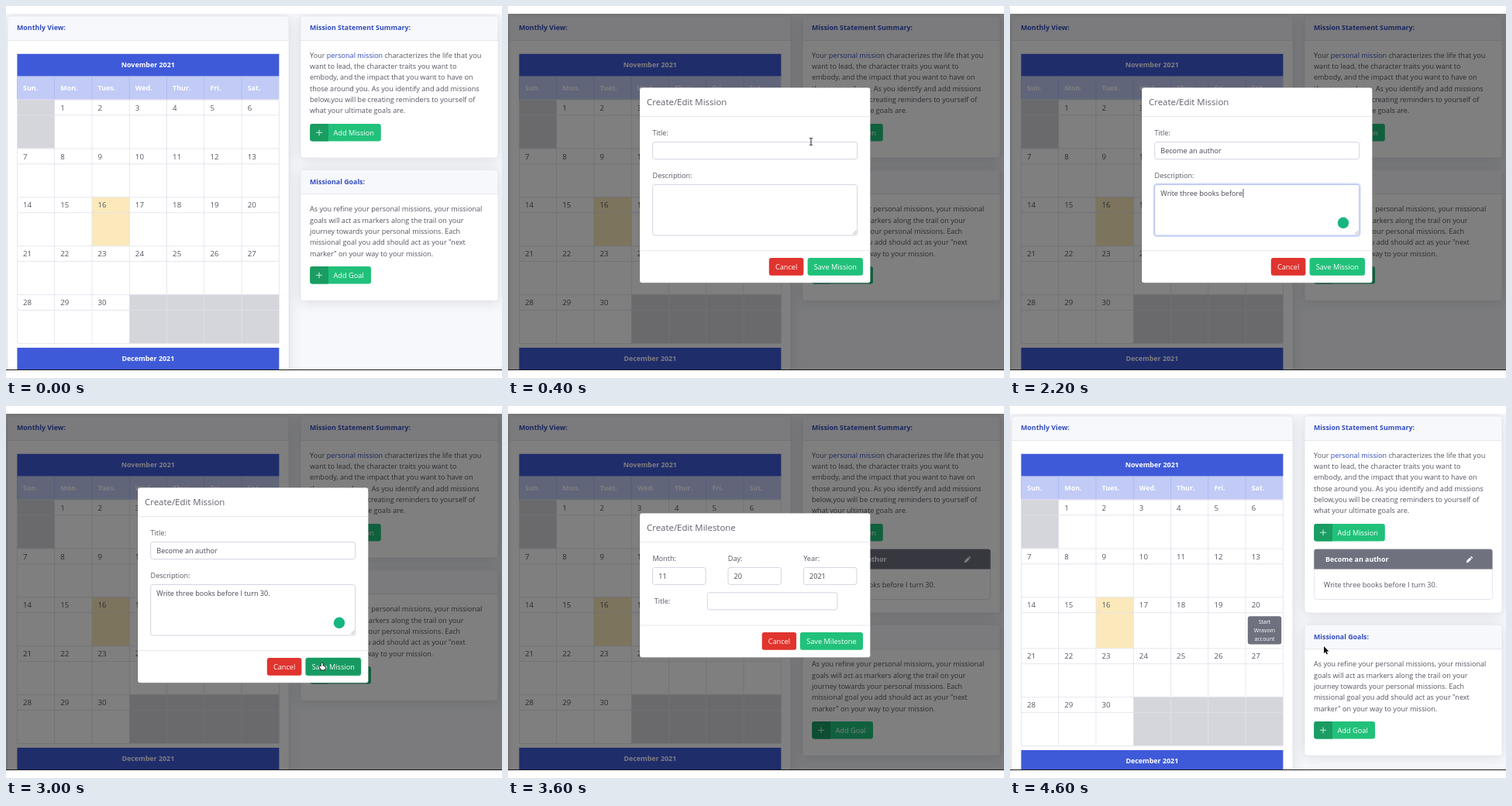
Write an HTML page with a canvas that moves like this. It is 640 px wide and 480 px high and loops after 4.8 s.

```html
<!DOCTYPE html>
<html lang="en">
<head>
<meta charset="utf-8">
<title>Mission planner</title>
<style>
html, body { margin: 0; width: 640px; height: 480px; overflow: hidden; background: #fff; }
canvas { display: block; }
</style>
</head>
<body>
<canvas id="stage" width="640" height="480"></canvas>
<script>
const ctx = document.getElementById('stage').getContext('2d');
const LOOP = 4800, STEP = 200;
const INK = '#555762', DARK = '#454752', BLUE = '#3f5ad8', TITLE = '#324cbe', LINE = '#e0e2ec';
const GREEN = '#21c17a', DARK_GREEN = '#1a9c63', RED = '#e0342e', SLATE = '#6f717f';
const MISSION = 'Become an author';
const DETAIL = 'Write three books before I turn 30.';
const MILESTONE = 'Start Wravom account';

function text(str, x, y, { size = 9.1, color = INK, bold = false, align = 'left' } = {}) {
  ctx.font = `${bold ? 'bold ' : ''}${size}px "Open Sans", "Noto Sans", sans-serif`;
  ctx.fillStyle = color;
  ctx.textAlign = align;
  ctx.fillText(str, x, y);
  return ctx.measureText(str).width;
}

function rect(x, y, w, h, color) {
  ctx.fillStyle = color;
  ctx.fillRect(x, y, w, h);
}

function round(x, y, w, h, r, fill, stroke, width = 1) {
  ctx.beginPath();
  ctx.roundRect(x, y, w, h, r);
  if (fill) { ctx.fillStyle = fill; ctx.fill(); }
  if (stroke) { ctx.strokeStyle = stroke; ctx.lineWidth = width; ctx.stroke(); }
}

function path(points, color, width) {
  ctx.beginPath();
  points.forEach(([x, y], i) => i ? ctx.lineTo(x, y) : ctx.moveTo(x, y));
  ctx.strokeStyle = color;
  ctx.lineWidth = width;
  ctx.stroke();
}

function card(x, y, w, h, title) {
  ctx.save();
  ctx.shadowColor = 'rgba(58,59,69,.15)';
  ctx.shadowBlur = 16.8;
  ctx.shadowOffsetY = 1.4;
  round(x, y, w, h, 3, '#fff');
  ctx.restore();
  round(x, y, w, 31, [3, 3, 0, 0], '#f7f8fc');
  rect(x, y + 31, w, 0.8, LINE);
  round(x, y, w, h, 3, null, LINE, 0.7);
  text(title, x < 100 ? 14 : 392, y + 18.3, { size: 8.85, color: TITLE, bold: true });
}

function addButton(y, w, label, hover) {
  round(392.3, y, w, 22.6, 3, hover ? '#179a62' : GREEN);
  round(392.3, y, 23.7, 22.6, [3, 0, 0, 3], hover ? '#147f51' : DARK_GREEN);
  path([[400.2, y + 11.3], [408, y + 11.3]], '#b5e3cd', 1.2);
  path([[404.1, y + 7.4], [404.1, y + 15.2]], '#b5e3cd', 1.2);
  text(label, 422.5, y + 14.7, { size: 9.2, color: '#fff' });
}

const LEFT = 14.4, COL = 48.28, WIDE = 338;
const colX = c => LEFT + c * COL;

function week(row, y, h) {
  for (let c = 0; c < 7; c++) {
    const day = row * 7 + c, x = colX(c);
    const off = day < 1 || day > 30;
    if (off || day === 16) rect(x, y, COL, h, off ? '#d5d5dc' : '#fbe9bb');
    if (!off) text(day, x + 7.6, y + 13.9, { size: 9.7 });
  }
  rect(LEFT, y, WIDE, 0.8, LINE);
  rect(LEFT, y + 19.8, WIDE, 0.8, LINE);
  for (let c = 0; c <= 7; c++) rect(colX(c) - 0.4, y, 0.8, h, LINE);
}

function monthBar(y, label) {
  rect(LEFT, y, WIDE, 28.8, BLUE);
  text(label, 183.3, y + 17.3, { size: 8.9, color: '#fff', bold: true, align: 'center' });
}

function calendar(booked) {
  card(2, 13, 363, 500, 'Monthly View:');
  monthBar(61.8, 'November 2021');
  rect(LEFT, 91, WIDE, 29.7, '#c1cbf6');
  ['Sun.', 'Mon.', 'Tues.', 'Wed.', 'Thur.', 'Fri.', 'Sat.'].forEach((name, c) => {
    text(name, colX(c) + 7.6, 109.2, { size: 8.9, color: '#fff', bold: true });
    rect(colX(c) - 0.4, 91, 0.8, 29.7, '#aab8ee');
  });
  let y = 120.7;
  for (let row = 0; row < 5; row++) {
    const h = booked && row === 2 ? 66 : 62.9;
    week(row, y, h);
    y += h;
  }
  rect(LEFT, y, WIDE, 0.8, LINE);
  monthBar(y + 5.7, 'December 2021');
  if (!booked) return;
  round(306.8, 271.3, 43.4, 36.2, 3, SLATE);
  MILESTONE.split(' ').forEach((word, i) =>
    text(word, 328.5, 280.6 + i * 11.3, { size: 7, color: '#fff', align: 'center' }));
}

function pencil(x, y) {
  path([[x - 2.6, y + 2.6], [x + 1.5, y - 1.5]], '#fff', 3);
  path([[x + 2.1, y - 2.1], [x + 3.2, y - 3.2]], '#fff', 3);
  ctx.fillStyle = '#fff';
  ctx.beginPath();
  ctx.moveTo(x - 4.2, y + 4.2);
  ctx.lineTo(x - 3.8, y + 1.4);
  ctx.lineTo(x - 1.4, y + 3.8);
  ctx.fill();
}

function lines(list, y) {
  list.forEach((s, i) => text(s, 392, y + i * 14.35));
}

function page(added, booked, hover) {
  rect(0, 10, 640, 460, '#f7f8fc');
  calendar(booked);

  card(380, 13, 255, added ? 254 : 183, 'Mission Statement Summary:');
  let x = 392;
  x += text('Your ', x, 66.7);
  x += text('personal mission', x, 66.7, { color: TITLE });
  text(' characterizes the life that you', x, 66.7);
  lines(['want to lead, the character traits you want to',
    'embody, and the impact that you want to have on',
    'those around you. As you identify and add missions',
    'below,you will be creating reminders to yourself of',
    'what your ultimate goals are.'], 81.05);
  addButton(152, 91.5, 'Add Mission', hover);
  if (added) {
    round(392.4, 184.8, 230, 64.8, 3, '#fff', LINE, 0.9);
    round(392.3, 184.8, 230.2, 25.8, [3, 3, 0, 0], SLATE);
    text(MISSION, 407, 200.7, { size: 8.9, color: '#fff', bold: true });
    pencil(593, 198);
    text(DETAIL, 404.8, 233.5);
  }

  const dy = added ? 71 : 0;
  card(380, 211.3 + dy, 255, 169, 'Missional Goals:');
  lines(['As you refine your personal missions, your missional',
    'goals will act as markers along the trail on your',
    'journey towards your personal missions. Each',
    'missional goal you add should act as your "next',
    'marker" on your way to your mission.'], 265.4 + dy);
  addButton(336 + dy, 78.7, 'Add Goal');
}

function field(x, y, w, h, value, focus) {
  if (focus) round(x - 1, y - 1, w + 2, h + 2, 4, null, '#d3dcf7', 2);
  round(x, y, w, h, 3, '#fff', focus ? '#aebdf0' : '#cfd1de', 0.9);
  const tw = text(value, x + 7.6, y + 14.1, { color: DARK });
  if (focus) rect(x + 8 + tw, y + 5.3, 0.9, 11.5, DARK);
}

function button(x, y, w, label, color) {
  round(x, y, w, 22.8, 3, color);
  text(label, x + w / 2, y + 14.8, { size: 9.2, color: '#fff', align: 'center' });
}

function modal(y, h, title) {
  rect(0, 10, 640, 460, 'rgba(0,0,0,.5)');
  round(170, y, 297.5, h, 3, '#fff', 'rgba(0,0,0,.2)', 0.6);
  text(title, 179, y + 22.5, { size: 11.45, color: '#5f616c' });
  rect(170, y + 37, 297.5, 0.8, LINE);
  rect(170, y + h - 42, 297.5, 0.8, LINE);
}

// Part of a string typed between two times
function typed(str, t, from, to, first = 0) {
  const k = Math.min(1, Math.max(0, (t - from) / (to - from)));
  return str.slice(0, Math.round(first + (str.length - first) * k));
}

function missionModal(t) {
  const writing = t >= 1400, saving = t >= 3000;
  modal(105.3, 252, 'Create/Edit Mission');
  text('Title:', 186.5, 167);
  field(186.7, 175.6, 264, 22, typed(MISSION, t, 600, 1200), t >= 600 && !writing);
  text('Description:', 186.5, 222);
  field(186.7, 230.5, 264, 65.5, writing ? typed(DETAIL, t, 1400, 2600, 1) : '', writing && !saving);
  path([[445, 294.5], [449.5, 290]], '#85868c', 0.7);
  path([[447.5, 294.5], [449.5, 292.5]], '#85868c', 0.7);
  if (writing) round(422.8, 272.6, 14.4, 14.4, 7.2, '#16b67e');
  button(336.8, 325, 44.6, 'Cancel', RED);
  if (saving) round(385.6, 324, 73.4, 24.8, 4, '#c4eedb');
  button(386.6, 325, 71.4, 'Save Mission', saving ? '#179a62' : GREEN);
}

function milestoneModal(t) {
  modal(138.3, 186.3, 'Create/Edit Milestone');
  [['Month:', '11'], ['Day:', '20'], ['Year:', '2021']].forEach(([label, value], i) => {
    const x = 186.6 + i * 97.4;
    text(label, x - 0.2, 200);
    field(x, 208.4, 68.6, 22, value);
  });
  text('Title:', 188.8, 255);
  field(257.4, 240.7, 167.6, 22.2, typed(MILESTONE, t, 3800, 4400), t >= 3800);
  button(327.7, 292, 44.4, 'Cancel', RED);
  button(376.8, 292, 81.2, 'Save Milestone', GREEN);
}

function arrow(x, y) {
  const pts = [[0, 0], [0, 9.2], [2.1, 7.3], [3.5, 10.4], [5, 9.7], [3.6, 6.7], [6.4, 6.5]];
  ctx.beginPath();
  pts.forEach(([px, py]) => ctx.lineTo(x + px, y + py));
  ctx.closePath();
  ctx.strokeStyle = '#fff';
  ctx.lineWidth = 1.4;
  ctx.stroke();
  ctx.fillStyle = '#111';
  ctx.fill();
}

function beam(x, y) {
  path([[x, y - 4.2], [x, y + 4.2]], '#222', 1);
  for (const s of [-1, 1]) path([[x - 2, y + s * 4.8], [x, y + s * 4], [x + 2, y + s * 4.8]], '#222', 0.9);
}

function hand(x, y) {
  ctx.beginPath();
  ctx.roundRect(x - 1.2, y - 4.4, 1.9, 7, 0.9);
  ctx.roundRect(x - 2.2, y - 0.6, 6, 5.2, 1.8);
  ctx.moveTo(x - 1.6, y + 3.4);
  ctx.lineTo(x - 3.8, y + 0.2);
  ctx.lineTo(x - 2.8, y - 0.4);
  ctx.lineTo(x - 1, y + 1.4);
  ctx.closePath();
  ctx.strokeStyle = '#111';
  ctx.lineWidth = 1.5;
  ctx.stroke();
  ctx.fillStyle = '#fff';
  ctx.fill();
}

const pointers = {
  200: [hand, 432, 166],
  400: [beam, 391, 175],
  2800: [arrow, 403, 314],
  3000: [hand, 408, 336],
  3200: [arrow, 367, 309],
  3400: [arrow, 327, 282],
  4600: [arrow, 405, 310]
};

function draw(t) {
  rect(0, 0, 640, 480, '#fff');
  ctx.save();
  ctx.beginPath();
  ctx.rect(0, 10, 640, 460);
  ctx.clip();
  page(t >= 3200, t >= 4600, t === 200);
  if (t >= 400 && t < 3200) missionModal(t);
  if (t >= 3600 && t < 4600) milestoneModal(t);
  const p = pointers[t];
  if (p) p[0](p[1], p[2]);
  ctx.restore();
  rect(0, 469, 640, 1, '#1a1a1c');
}

let start = null;
function tick(now) {
  if (start === null) start = now;
  draw(Math.floor((now - start) % LOOP / STEP) * STEP);
  requestAnimationFrame(tick);
}
draw(0);
requestAnimationFrame(tick);
</script>
</body>
</html>
```
